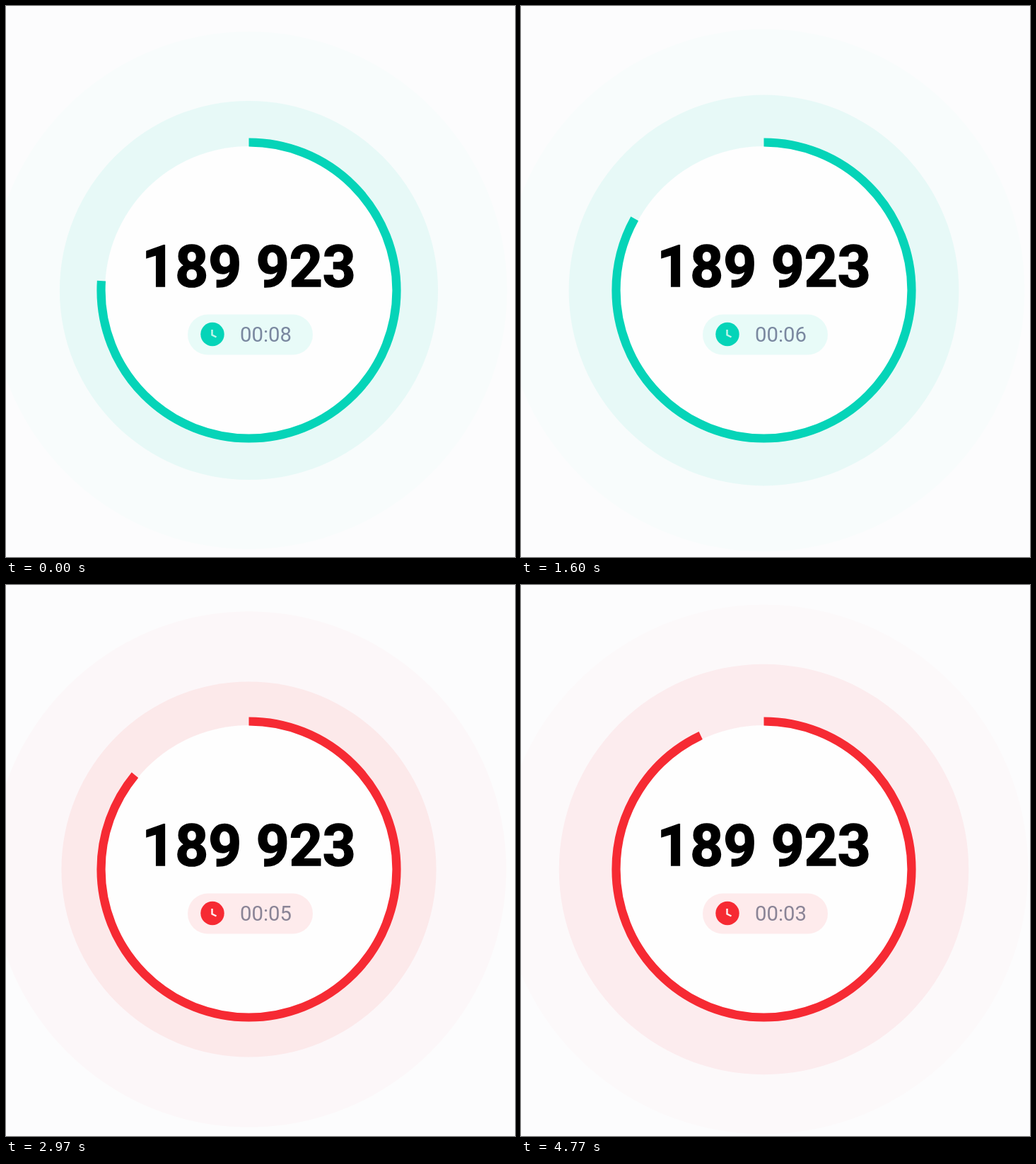
Recreate the animation shown at these times as an HTML page. Size 720x778 px, loop 4810 ms.

```html
<!DOCTYPE html>
<html lang="en">
<head>
<meta charset="utf-8">
<title>Code countdown</title>
<style>
  html, body { margin: 0; width: 100%; height: 100%; overflow: hidden; background: #fcfcfd; }
  svg { display: block; width: 720px; height: 778px; font-family: Roboto, sans-serif; }
</style>
</head>
<body>
<svg viewBox="0 0 720 778">
  <rect width="720" height="778" fill="#fcfcfd"/>
  <g id="pulses">
    <circle cx="343.5" cy="401.5"/>
    <circle cx="343.5" cy="401.5"/>
  </g>
  <circle cx="343.5" cy="401.5" r="203.5" fill="#fefefe"/>
  <circle id="ring" cx="343.5" cy="401.5" r="209" fill="none" stroke-width="12.2"
    pathLength="360" transform="rotate(-90 343.5 401.5)"/>
  <text x="343.5" y="396" font-size="82" font-weight="700" text-anchor="middle"
    stroke="#000" stroke-width="1.6">189 923</text>
  <rect id="pill" x="257" y="435.5" width="177" height="57" rx="28.5" fill-opacity=".085"/>
  <circle id="face" cx="292" cy="463.5" r="16.7"/>
  <path id="hands" d="M291.5 457V464.5L297.5 467.5" fill="none" stroke-width="2.5"/>
  <text id="clock" x="331" y="474" font-size="29.3"></text>
</svg>
<script>
const LOOP = 4810, FIRST_TICK = 400, LIFE = 3000, STAGGER = 1500, PULSE_START = 740;
const R_MIN = 208, R_MAX = 380, PULSE_ALPHA = 0.1, FADE = 1.25;
const ARC_ENDS = [273.7, 288, 299, 309.6, 323.8, 334.7];
const CALM = { main: '#05d4b8', text: '#7a88a0', hands: '#c0f5ea' };
const ALERT = { main: '#f62a33', text: '#8a8496', hands: '#ffeef0' };

const $ = id => document.getElementById(id);
const pulses = [...$('pulses').children];

function set(el, attrs) {
  for (const key in attrs) el.setAttribute(key, attrs[key]);
}

const bezier = (s, a, b) => 3 * (1 - s) ** 2 * s * a + 3 * (1 - s) * s * s * b + s ** 3;

function ease(x) {
  let lo = 0, hi = 1;
  for (let i = 0; i < 20; i++) {
    const mid = (lo + hi) / 2;
    if (bezier(mid, 0.2, 0.58) < x) lo = mid; else hi = mid;
  }
  return bezier(lo, 0.2, 1);
}

function draw(t) {
  const tick = Math.max(0, Math.floor((t - FIRST_TICK) / 1000) + 1);
  const left = 8 - tick;
  const theme = left <= 5 ? ALERT : CALM;

  pulses.forEach((el, i) => {
    const age = (t - PULSE_START + i * STAGGER + LIFE) % LIFE;
    const x = age / LIFE;
    set(el, {
      r: R_MIN + (R_MAX - R_MIN) * ease(x),
      fill: theme.main,
      'fill-opacity': PULSE_ALPHA * (1 - x) ** FADE
    });
  });

  set($('ring'), { stroke: theme.main, 'stroke-dasharray': `${ARC_ENDS[tick]} 360` });
  set($('pill'), { fill: theme.main });
  set($('face'), { fill: theme.main });
  set($('hands'), { stroke: theme.hands });
  set($('clock'), { fill: theme.text });
  $('clock').textContent = `00:0${left}`;
}

const start = performance.now();
function loop(now) {
  draw(Math.max(0, now - start) % LOOP);
  requestAnimationFrame(loop);
}
draw(0);
requestAnimationFrame(loop);
</script>
</body>
</html>
```
